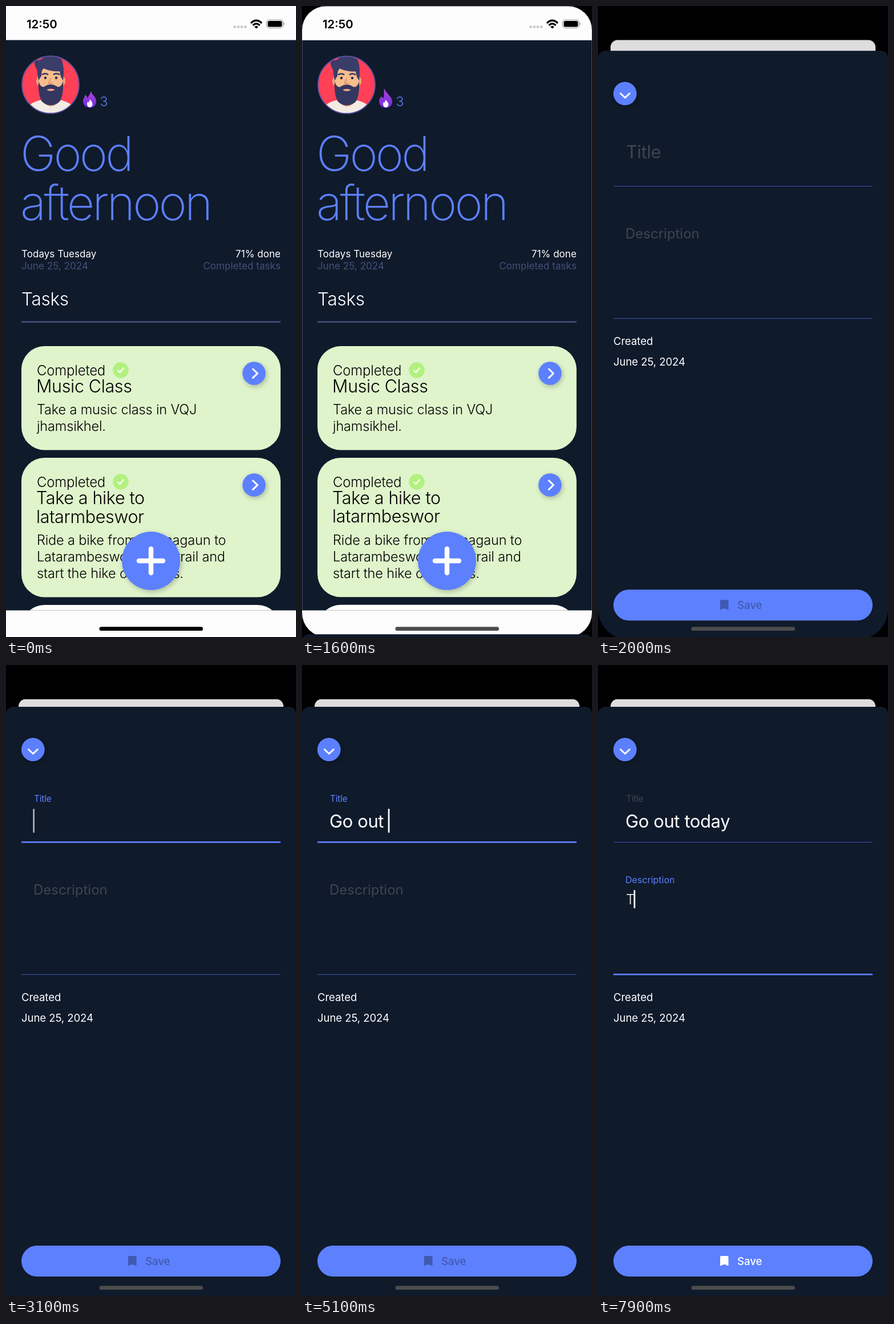
Recreate the animation shown at these times as an HTML page. Size 508 by 1102 pixels, loop 8000 ms.

```html
<!DOCTYPE html>
<html lang="en">
<head>
<meta charset="utf-8">
<title>Tasks</title>
<style>
html, body { margin: 0; width: 100%; height: 100%; overflow: hidden; background: #000; }
svg { display: block; width: 508px; height: 1102px; font-family: Inter, "Noto Sans", sans-serif; }
text { white-space: pre; }
.light { font-weight: 300; }
.small { font-size: 17px; letter-spacing: .05px; }
.head { font-size: 30.5px; letter-spacing: -.35px; }
.body { font-size: 23.5px; letter-spacing: -.15px; }
.big { font-size: 84px; font-weight: 200; letter-spacing: -3.8px; }
.field { font-size: 31px; letter-spacing: -.4px; }
.note { font-size: 24px; }
.meta { font-size: 18.6px; letter-spacing: -.1px; }
.raised { filter: drop-shadow(2px 3px 4px rgba(0, 0, 0, .24)); }
.stroke { fill: none; stroke: #fff; stroke-width: 3; stroke-linecap: round; stroke-linejoin: round; }
#status { mix-blend-mode: darken; }
</style>
</head>
<body>
<svg viewBox="0 0 508 1102">
  <defs>
    <clipPath id="pageClip"><rect id="pageShape" width="508" height="1102"/></clipPath>
    <clipPath id="listClip"><rect y="59.600" width="508" height="996"/></clipPath>
    <clipPath id="faceClip"><circle cx="78" cy="137.500" r="50"/></clipPath>
    <linearGradient id="fire" x2="0" y2="1">
      <stop stop-color="#b544d8"/><stop offset="1" stop-color="#6a2be0"/>
    </linearGradient>
    <g id="go">
      <circle class="raised" cx="434.500" cy="641.500" r="20.300" fill="#5d80ff"/>
      <path class="stroke" d="M432.500 634l8 7.700-8 7.700"/>
    </g>
    <g id="done">
      <text class="light note" letter-spacing="-.2" x="54" y="645">Completed</text>
      <circle cx="201" cy="636" r="13.700" fill="#b2f07f"/>
      <path class="stroke" style="stroke-width:2.200" d="M196 636.500l3.500 3.500 6.500-7.500"/>
    </g>
  </defs>
  <rect width="508" height="1102"/>

  <g id="page"><g clip-path="url(#pageClip)">
    <rect width="508" height="1102" fill="#fdfdfe"/>
    <g clip-path="url(#listClip)">
      <rect y="59" width="508" height="1000" fill="#0f1a2b"/>
      <g clip-path="url(#faceClip)">
        <rect x="27" y="86" width="102" height="103" fill="#ff4056"/>
        <path d="M32 190Q34 170 62 164H94Q122 170 126 190Z" fill="#f2ece4"/>
        <path d="M63 150H94V166Q79 184 63 166Z" fill="#e39b6d"/>
        <ellipse cx="57" cy="131" rx="4" ry="7.500" fill="#eba878"/>
        <ellipse cx="100" cy="131" rx="4" ry="7.500" fill="#eba878"/>
        <path d="M58 108H99V140Q97 164 78 164Q60 164 58 140Z" fill="#f6bd8d"/>
        <path d="M57 132Q61 143 67 141Q78 133 90 141Q96 143 100 132Q101 156 94 167Q78 180 63 167Q56 156 57 132Z" fill="#343760"/>
        <path d="M71 146Q78 143 86 146Q78 151 71 146Z" fill="#f0a88a"/>
        <path d="M57 130Q55 117 54 110Q48 103 51 93Q60 98 66 89Q82 84 97 93Q103 106 100 130Q95 124 94 114Q78 115 66 109Q62 112 62 122Z" fill="#3a3c69"/>
        <path d="M63 120q6-4 11 0M83 120q5-4 11 0" fill="none" stroke="#343760" stroke-width="2.500"/>
        <circle cx="69" cy="125.500" r="2.200" fill="#262848"/><circle cx="88" cy="125.500" r="2.200" fill="#262848"/>
        <path d="M78 126l-3 9h7" fill="none" stroke="#df9568" stroke-width="2"/>
      </g>
      <circle cx="78" cy="137.500" r="50" fill="none" stroke="#5b4f9e" stroke-width="1.800"/>
      <path id="flame" fill="url(#fire)"/>
      <path id="ember" fill="#fff"/>
      <g fill="#5d80ff">
        <text x="164.500" y="175" font-size="23" class="light">3</text>
        <text class="big" x="25" y="287.500">Good</text>
        <text class="big" x="25" y="374">afternoon</text>
      </g>
      <g class="small">
        <text x="27" y="439" fill="#fff">Todays Tuesday</text>
        <text x="27" y="460" fill="#454f7a">June 25, 2024</text>
        <text x="481" y="439" fill="#fff" text-anchor="end">71% done</text>
        <text x="481" y="460" fill="#454f7a" text-anchor="end">Completed tasks</text>
      </g>
      <text class="light" font-size="31.500" letter-spacing="-.3" x="27" y="523" fill="#fff">Tasks</text>
      <rect x="27" y="550.300" width="454" height="2.700" fill="#434d76"/>
      <g fill="#dff4cb">
        <rect x="27" y="594" width="454" height="181.500" rx="40.600"/>
        <rect x="27" y="789" width="454" height="243.500" rx="40.600"/>
        <rect x="27" y="1046" width="454" height="200" rx="40.600" fill="#fdfdfe"/>
      </g>
      <use href="#done"/><use href="#go"/>
      <use href="#done" y="195"/><use href="#go" y="195"/>
      <g class="light head">
        <text x="53" y="675">Music Class</text>
        <text x="53" y="870">Take a hike to</text>
        <text x="53" y="902.500">latarmbeswor</text>
      </g>
      <g class="light body">
        <text x="54" y="713">Take a music class in VQJ</text>
        <text x="54" y="742">jhamsikhel.</text>
        <text x="54" y="941">Ride a bike from Dhanagaun to</text>
        <text x="54" y="970">Latarambeswor hiking trail and</text>
        <text x="54" y="999">start the hike on stones.</text>
      </g>
      <circle class="raised" cx="254" cy="969" r="51" fill="#5d80ff"/>
      <path class="stroke" style="stroke-width:8.500" d="M254 948v42M233 969h42"/>
    </g>
    <rect id="shade" width="508" height="1102"/>
  </g></g>

  <g id="status">
    <text x="36" y="38.500" font-size="20.400" font-weight="600">12:50</text>
    <path d="M400.500 36.500h.01M407 36.500h.01M413 36.500h.01M419.300 36.500h.01" stroke="#c4c4c6" stroke-width="4.600" stroke-linecap="round"/>
    <path d="M429 30Q438.500 20.500 448 30M432.500 33.800Q438.500 28 444.500 33.800" fill="none" stroke="#000" stroke-width="3.200"/>
    <path d="M435 36.300Q438.500 33.200 442 36.300L438.500 39.500Z"/>
    <rect x="456.500" y="24" width="29" height="14.500" rx="4.500" fill="none" stroke="#999" stroke-width="1.200"/>
    <rect x="458.500" y="26" width="25" height="10.500" rx="2.800"/>
    <path d="M487 28.500q2.500 2.700 0 5.500Z" fill="#999"/>
  </g>

  <g id="sheet">
    <path id="sheetShape" fill="#0f1a2b"/>
    <circle class="raised" cx="47.300" cy="74.700" r="20.400" fill="#5d80ff"/>
    <path class="stroke" d="M39.500 74.500l7.900 7.500 7.900-7.500"/>
    <text id="titleLabel" class="field">Title</text>
    <text id="titleText" class="field" x="48" y="211" fill="#fff"></text>
    <rect id="titleLine" x="27" width="454"/>
    <text id="noteLabel" class="note">Description</text>
    <text id="noteText" class="note light" x="49" y="345" fill="#fff"></text>
    <rect id="noteLine" x="27" width="454"/>
    <rect id="caret" width="2.700" rx="1.300" fill="#fff"/>
    <g class="meta" fill="#fff">
      <text x="27" y="513.500">Created</text>
      <text x="27" y="550">June 25, 2024</text>
    </g>
    <rect x="27" y="941" width="454" height="54" rx="27" fill="#5d80ff"/>
    <g id="save">
      <path d="M214 976.500V961Q214 959 216 959H226.500Q228.500 959 228.500 961V976.500L221.250 973.500Z"/>
      <text x="244" y="974.800" font-size="18.600" font-weight="500">Save</text>
    </g>
  </g>
  <rect id="home" x="163.500" y="1084.300" width="181.500" height="6.700" rx="3.350"/>
</svg>
<script>
const LOOP = 8000, OPEN = 1595.5, TITLE = 2500, NOTE = 6650, READY = 7800;
const BLUE = '#5d80ff', GREY = '#41444e', THIN = '#3c54ad';
const titleKeys = [4100, 4250, 4400, 4600, 4750, 4900, 5050, 5600, 5720, 5850, 5980, 6100];
const noteKeys = [READY];
const el = id => document.getElementById(id);
const set = (id, attrs) => { for (const k in attrs) el(id).setAttribute(k, attrs[k]); };
const mix = (a, b, k) => a + (b - a) * k;
const clamp = x => Math.max(0, Math.min(1, x));
const ease = x => { x = clamp(x); return x * x * (3 - 2 * x); };
const spring = ms => { const x = Math.max(0, ms) * .01826; return 1 - (1 + x) * Math.exp(-x); };

// Solid, fade out, dark, fade in
function blink(ms) {
  const u = ms < 550 ? ms : (ms - 550) % 1100 + 550;
  return u < 950 ? 1 - clamp((u - 550) / 150) : clamp((u - 950) / 200);
}

function field(name, t, focus, blur, o) {
  const k = ease((t - focus) / 150), on = t >= focus && t < blur;
  const typed = o.keys.filter(at => at <= t);
  set(name + 'Label', {
    transform: `translate(${49 - o.inset},${mix(o.rest, o.up, k)}) scale(${mix(1, o.scale, k)})`,
    fill: on ? BLUE : GREY
  });
  set(name + 'Line', { y: on ? o.line - 1 : o.line, height: on ? 2.7 : 1, fill: on ? BLUE : THIN });
  const text = el(name + 'Text');
  text.textContent = o.text.slice(0, typed.length);
  if (on) set('caret', {
    x: 47.3 + (typed.length ? text.getComputedTextLength() : 0),
    y: o.caret, height: o.tall,
    opacity: blink(t - (typed.length ? typed[typed.length - 1] : focus))
  });
}

function drawFlame(t) {
  const a = t * Math.PI / 1000, c = Math.cos(a), s = Math.sin(a);
  const x = 147 + 2 * c + 3.5 * s, y = 149 + 5.5 * s, lobe = 159 - 4 * c;
  set('flame', { d: `M${x} ${y}C${x + 2} ${y + 8} 158.500 158 158 167C158 174 153 177.500 147 177.500` +
    `C140 177.500 135 173 135 166C135 161 138 160 138.500 ${lobe}Q142 ${lobe + 2} 142.500 161C145 157 ${x - 2} ${y + 5} ${x} ${y}Z` });
  set('ember', { d: `M${147 + s} ${164 - c}Q152 168 151.500 173Q150 177 146.500 177Q142 176 142 171Q142 169 143.500 167L145 169Z` });
}

function draw(t) {
  const p = spring(t - OPEN), open = t >= OPEN, scale = mix(1, .9134, p);
  set('page', { transform: `translate(${254 * (1 - scale)},${59.6 * p}) scale(${scale})` });
  set('pageShape', { rx: open ? mix(42, 14, p) : 0 });
  set('shade', { opacity: .125 * p });
  set('sheet', { transform: `translate(0,${mix(1102, 73, p)})` });
  const r = p < .999 ? 55 : 0;
  set('sheetShape', { d: `M0 14Q0 0 14 0H494Q508 0 508 14V${1029 - r}a${r} ${r} 0 0 1 ${-r} ${r}H${r}a${r} ${r} 0 0 1 ${-r} ${-r}Z` });
  set('home', { fill: open ? '#4d4d4d' : '#000' });
  set('caret', { opacity: 0 });
  field('title', t, TITLE, NOTE, {
    text: 'Go out today', keys: titleKeys, rest: 188, up: 166.3, scale: .5, inset: 0, line: 236, caret: 178, tall: 42
  });
  field('note', t, NOTE, LOOP, {
    text: 'T', keys: noteKeys, rest: 327.5, up: 308.3, scale: .667, inset: 1, line: 467, caret: 320, tall: 32
  });
  set('save', { fill: t >= READY ? '#fff' : '#4059b0' });
  drawFlame(t);
}

function tick() {
  draw(performance.now() % LOOP);
  requestAnimationFrame(tick);
}
tick();
</script>
</body>
</html>
```
